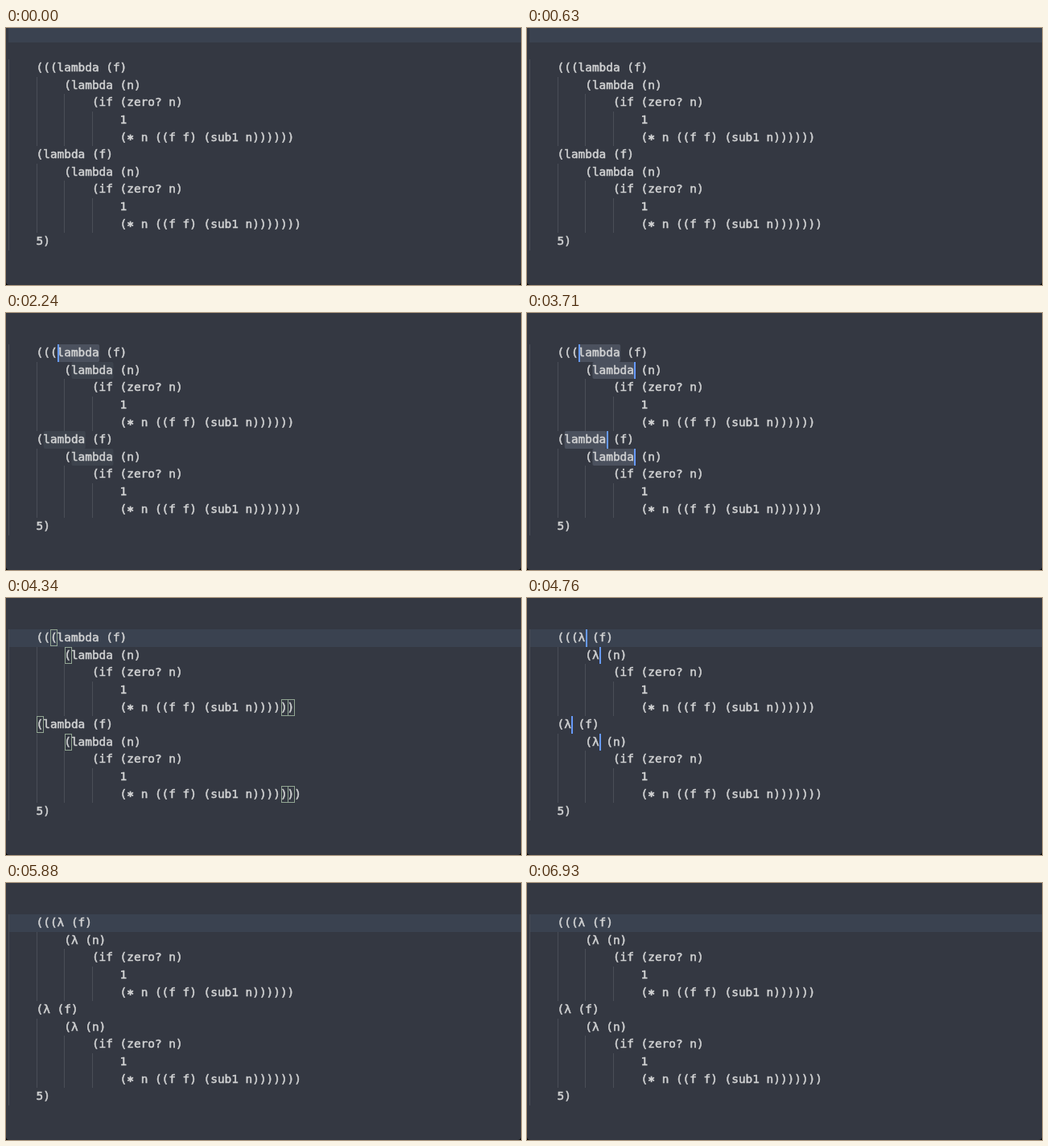
An HTML page that plays this animation: 640 by 320 pixels, repeating every 7 s.

```html
<!DOCTYPE html>
<html lang="en">
<head>
<meta charset="utf-8">
<title>Multiple cursors</title>
<style>
  html, body { margin: 0; width: 100%; height: 100%; overflow: hidden; background: #000; }
  svg { display: block; width: 640px; height: 320px; background: #343842; border-radius: 0 0 4px 4px; }
  text {
    font: 14.4px "DejaVu Sans Mono", "Liberation Mono", monospace; white-space: pre;
    fill: #d0d1d2; stroke: #d0d1d2; stroke-width: .55px;
  }
  .star { stroke-width: 1px; }
  .line { fill: #3a4250; }
  .guide { fill: #4a4e57; }
  .match { fill: #3d434d; }
  .selected { fill: #4b515e; }
  .bracket { fill: none; stroke: #92a693; }
  .cursor { fill: #6699f8; }
</style>
</head>
<body>
<svg viewBox="0 0 640 320">
  <g id="back"></g>
  <g id="guides"></g>
  <g id="code"></g>
  <g id="front"></g>
</svg>
<script>
const LOOP = 7000, LEFT = 3.4, CHAR = 8.67, ROW = 21.6, TOP = -4;
const x = col => LEFT + col * CHAR;
const y = row => Math.round(TOP + row * ROW);
const el = id => document.getElementById(id);

const rect = (cls, left, top, width, height, extra = "") =>
  `<rect class="${cls}" x="${left}" y="${top}" width="${width}" height="${height}" ${extra}/>`;

// Code lines: [row, column, text]; W stands for the edited word
const body = row => [
  [row, 8, "(W (n)"],
  [row + 1, 12, "(if (zero? n)"],
  [row + 2, 16, "1"]
];
const lines = [
  [2, 4, "(((W (f)"], ...body(3), [6, 16, "(* n ((f f) (sub1 n))))))"],
  [7, 4, "(W (f)"], ...body(8), [11, 16, "(* n ((f f) (sub1 n)))))))"],
  [12, 4, "5)"]
];
const words = [[2, 7], [3, 9], [7, 5], [8, 9]];
const firstPair = [[2, 6], [6, 40]];
const allPairs = [...firstPair, [3, 8], [6, 39], [7, 4], [11, 40], [8, 8], [11, 39]];

const shift = n => words.map(([row, col]) => [row, col + n]);
// The first cursor stays in front of its word, the added ones follow theirs
const picked = n => ({
  line: null, pairs: [], selected: n,
  cursors: shift(6).slice(0, n).map((c, i) => i ? c : words[0])
});

// Each step changes part of the state from its time on
const steps = [
  [0, { line: 0, cursors: [], pairs: [], selected: 0, matches: false, word: "lambda" }],
  [70, { cursors: [[0, 0]] }],
  [560, { cursors: [] }],
  [1120, { line: 1, cursors: [[1, 0]] }],
  [1260, { line: 2, cursors: [[2, 0]] }],
  [1540, { cursors: [words[0]] }],
  [1610, { pairs: firstPair }],
  [1680, picked(1)],
  [2240, { matches: true }],
  [2660, picked(2)],
  [2940, picked(3)],
  [3220, picked(4)],
  [3850, { line: 2, cursors: words, selected: 0, matches: false }],
  [3920, { pairs: allPairs }],
  [4270, { cursors: [] }],
  [4410, { word: "λ", cursors: shift(1) }],
  [4480, { pairs: [] }],
  [4900, { cursors: [] }],
  [5320, { cursors: shift(1) }],
  [5810, { cursors: [] }],
  [6370, { cursors: shift(1) }],
  [6860, { cursors: [] }]
];

function drawGuides() {
  const guide = (col, from, to) =>
    rect("guide", Math.floor(x(col)), y(from), 1, y(to) - y(from));
  let out = guide(0, 2, 13);
  for (const row of [3, 8])
    for (const i of [0, 1, 2]) out += guide(4 + i * 4, row + i, row + 4);
  el("guides").innerHTML = out;
}

function drawBack({ line, selected, matches }) {
  let out = line === null ? "" : rect("line", 3, y(line), 637, y(line + 1) - y(line));
  words.forEach(([row, col], i) => {
    const cls = i < selected ? "selected" : matches ? "match" : "";
    if (cls) out += rect(cls, x(col), y(row), 6 * CHAR, y(row + 1) - y(row), 'rx="2"');
  });
  el("back").innerHTML = out;
}

function drawCode(word) {
  // The asterisk sits lower, centred on the line
  const star = '<tspan class="star" dy="2">*</tspan><tspan dy="-2"> </tspan>';
  el("code").innerHTML = lines.map(([row, col, text]) =>
    `<text x="${x(col) - .5}" y="${y(row) + 15}" xml:space="preserve">` +
    text.replace("W", word).replace("* ", star) + "</text>").join("");
}

function drawFront({ pairs, cursors }) {
  el("front").innerHTML =
    pairs.map(([row, col]) =>
      rect("bracket", Math.round(x(col)) + .5, y(row) + .5, 8, 20)).join("") +
    cursors.map(([row, col]) =>
      rect("cursor", Math.round(x(col)), y(row), 2, y(row + 1) - y(row))).join("");
}

let current = -1;
function frame() {
  const t = performance.now() % LOOP;
  const index = steps.filter(([start]) => start <= t).length - 1;
  if (index !== current) {
    current = index;
    const state = Object.assign({}, ...steps.slice(0, index + 1).map(step => step[1]));
    drawBack(state);
    drawCode(state.word);
    drawFront(state);
  }
  requestAnimationFrame(frame);
}

drawGuides();
frame();
</script>
</body>
</html>
```
